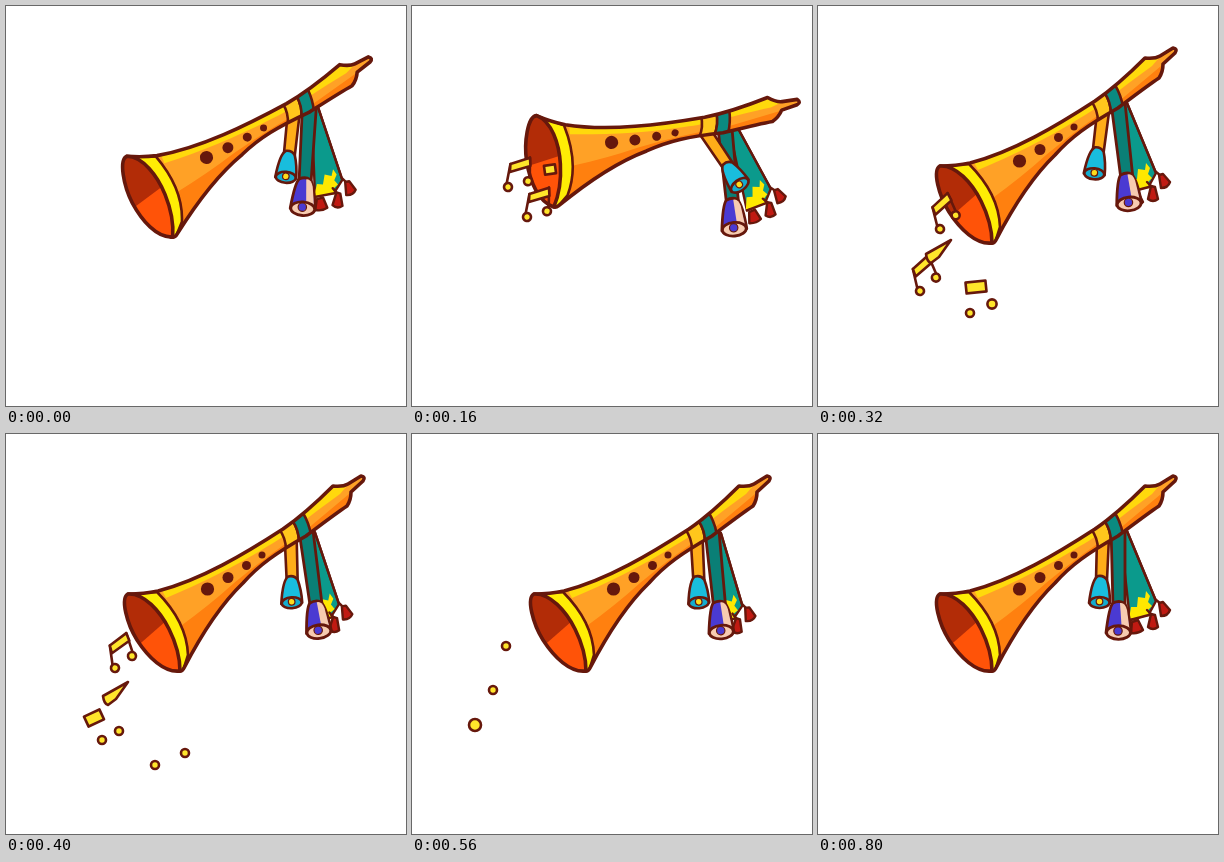
An HTML page that plays this animation: 400 by 400 pixels, repeating every 0.88 s.

```html
<!DOCTYPE html>
<html lang="en">
<head>
<meta charset="utf-8">
<title>Festive horn</title>
<style>
  html, body { margin: 0; width: 100%; height: 100%; overflow: hidden; background: #fff; }
  svg { display: block; width: 100vw; height: 100vh; }
  .line { stroke: #66180c; stroke-linejoin: round; stroke-linecap: round; }
</style>
</head>
<body>
<svg viewBox="0 0 400 400">
  <defs>
    <path id="shell" d="M122 160Q138 160 152 157C195 146 240 119 277 95C296 82 313 66 327 52Q337 53 342 50L355 42Q360 43 357 47L345 58Q345 66 341 72C329 80 312 93 300 102C270 119 253 131 237 149C212 173 193 205 178 234Q176 238 172 237"/>
    <path id="lip" d="M122 160C138 159 154 177 163 195C170 209 174 225 174 237C158 239 142 223 131 206C121 190 114 164 122 160Z"/>
    <clipPath id="body"><use href="#shell"/></clipPath>
    <clipPath id="mouth"><use href="#lip"/></clipPath>
  </defs>

  <g id="scarf" class="line" stroke-width="2.4">
    <path fill="#0b9a8c" d="M302 95L309 97L338 167L331 180L312 186Z"/>
    <path fill="#ffe800" stroke="none" d="M311 185L313 173L319 173L320 163L327 164L328 157L332 162L330 168L334 172L329 177L332 182Z"/>
    <path fill="none" d="M309 97L338 167M312 186L331 181M329 176L334 181M337 165L343 170"/>
    <g fill="#c01a12">
      <path d="M314 188L320 186L325 196Q320 200 313 199Z"/>
      <path d="M333 180L337 181L340 193Q335 197 330 193Z"/>
      <path d="M341 169L345 168L352 176Q350 182 343 182Z"/>
    </g>
  </g>

  <g id="long" class="line" stroke-width="2.8">
    <path fill="#0a7f76" d="M293 94L307 92L307 173L295 173Z"/>
    <path fill="#4a3ad2" d="M288 199Q291 173 295 169Q301 166 306 169Q311 175 313 199Z"/>
    <path fill="#f7cbb0" stroke="none" d="M302 169Q307 168 309 176L312 199L304 199Z"/>
    <ellipse cx="300.5" cy="198.5" rx="12" ry="6.8" fill="#f7cbb0"/>
    <circle cx="300" cy="197" r="4.2" fill="#4a3ad2" stroke-width="1.2"/>
  </g>

  <g id="short" class="line" stroke-width="2.6">
    <path fill="#ffad19" d="M279 104L291 103L289 146L278 146Z"/>
    <path fill="#19bddd" d="M271 169Q274 145 280 142Q286 141 289 146Q292 156 292 169Z"/>
    <ellipse cx="281.5" cy="168.5" rx="10" ry="5.5" fill="#14acce"/>
    <circle cx="281.5" cy="167.5" r="3.3" fill="#ffdc1c" stroke-width="1.2"/>
  </g>

  <g id="horn" class="line" stroke-width="3.6">
    <g clip-path="url(#body)" stroke="none">
      <path fill="#ffa126" d="M100 30H370V250H100Z"/>
      <path fill="#ff800f" d="M172 194Q205 170 228 149Q263 120 300 96L343 60L352 80L180 240Z"/>
      <path fill="#ffd90c" d="M150 145L327 46L346 46L334 60C300 84 284 100 262 112C228 133 196 149 160 164Z"/>
      <g stroke="#66180c" stroke-width="2.6">
        <path fill="#ffc61c" d="M273 95Q280 104 280 116L293 108Q293 96 286 86Z"/>
        <path fill="#0a8a80" d="M286 86Q293 96 293 108L305 101Q303 89 297 79Z"/>
        <path fill="#ffed05" d="M122 160L151 158C166 173 181 193 182 221L176 240Z"/>
      </g>
    </g>
    <use href="#shell" fill="none"/>
    <g clip-path="url(#mouth)" stroke="none">
      <path fill="#ff5308" d="M100 150H190V245H100Z"/>
      <path fill="#b22c07" d="M100 150H150L160 187L136 208L120 220Z"/>
    </g>
    <use href="#lip" fill="none"/>
    <g fill="#66180c" stroke="none">
      <circle cx="201.500" cy="155" r="6.600"/>
      <circle cx="222" cy="143.500" r="5.500"/>
      <circle cx="240.500" cy="131.500" r="4.500"/>
      <circle cx="256" cy="121" r="3.500"/>
    </g>
  </g>

  <g id="notes" class="line" fill="#ffe52b" stroke-width="2.6"></g>
</svg>

<script>
const STEP = 80, COUNT = 11;
const el = id => document.getElementById(id);
const pivot = [245.5, 141];

// degrees for each step
const tilt = [4.5, 13.5, 23.3, 11.7, 0, 0, 0, 0, 0, 0, 0];
const hangers = [
  { id: 'scarf', at: [290, 97], swing: [-4, 1, 6, 2, 0, -4, -8, -6, -4, -2, 0] },
  { id: 'long', at: [300, 97], swing: [-4, 0, 5, 6, 6, 7, 8, 5, 2, 1, 0] },
  { id: 'short', at: [287, 108], swing: [-4, 12, 36, 15, -5, 4, 13, 5, -1, 0, 0] }
];

const dot = (x, y, r = 4) => `<circle cx="${x}" cy="${y}" r="${r}"/>`;
const place = (x, y, a, d, fill = '') =>
  `<path transform="translate(${x} ${y}) rotate(${a})" ${fill} d="${d}"/>`;
const bar = (x, y, w, a, h = 11) =>
  place(x, y, a, `M${-w / 2} ${-h / 2}H${w / 2}V${h / 2}H${-w / 2}Z`);
const stem = (x, y, x2, y2) => `<path fill="none" d="M${x} ${y}L${x2} ${y2}"/>`;
const wedge = (x, y, a = 0) => place(x, y, a, 'M-25 14L0 0L-12 17L-20 23Q-24 22 -25 14Z');

// x, y is the centre of the left head
const note = (x, y, a) =>
  place(x, y, a, 'M-2 -2V-23M20 -11L16 -33', 'fill="none"') +
  place(x, y, a, 'M-2 -23L16 -33L18 -25L-1 -15Z') +
  `<g transform="translate(${x} ${y}) rotate(${a})">${dot(0, 0)}${dot(18.5, -9.5)}</g>`;

const bits = [
  '',
  bar(131, 166, 13, -20, 8) + bar(139, 193, 13, -20, 8),
  note(96, 181, 11) + note(115, 211, 11) + bar(138, 163.5, 11, -8, 9),
  note(92, 232, 0) + note(120, 258, 0) + wedge(139, 192, 13) + bar(140, 169, 11, -45, 8),
  note(122, 223, -14) + note(102, 285, -13) + wedge(133, 234) +
    bar(158, 281, 20, -6) + dot(152, 307) + dot(174, 298, 4.6),
  note(109, 234, -8) + wedge(122, 248) + bar(88, 284, 17, -25) +
    dot(96, 306) + dot(113, 297) + dot(149, 331) + dot(179, 319),
  bar(101, 218, 20, -4) + dot(118, 215) + dot(96, 244) + dot(117, 236) +
    wedge(110, 261) + stem(118, 197, 122, 212) + bar(126, 192, 15, -33, 8),
  dot(94, 212) + dot(81, 256) + dot(63, 291, 6),
  dot(79, 208) + dot(58, 299.5, 7),
  dot(44.5, 303.5, 6.4),
  ''
];

function turn([x, y], deg) {
  const a = deg * Math.PI / 180, c = Math.cos(a), s = Math.sin(a);
  const dx = x - pivot[0], dy = y - pivot[1];
  return [pivot[0] + dx * c - dy * s, pivot[1] + dx * s + dy * c];
}

function draw(step) {
  const a = tilt[step];
  el('horn').setAttribute('transform', `rotate(${a} ${pivot})`);
  for (const { id, at, swing } of hangers) {
    const [x, y] = turn(at, a);
    el(id).setAttribute('transform',
      `translate(${x - at[0]} ${y - at[1]}) rotate(${-swing[step]} ${at})`);
  }
  el('notes').innerHTML = bits[step];
}

let shown = -1;
const start = performance.now();
function tick() {
  const step = Math.floor((performance.now() - start) / STEP) % COUNT;
  if (step !== shown) draw(shown = step);
  requestAnimationFrame(tick);
}
tick();
</script>
</body>
</html>
```
